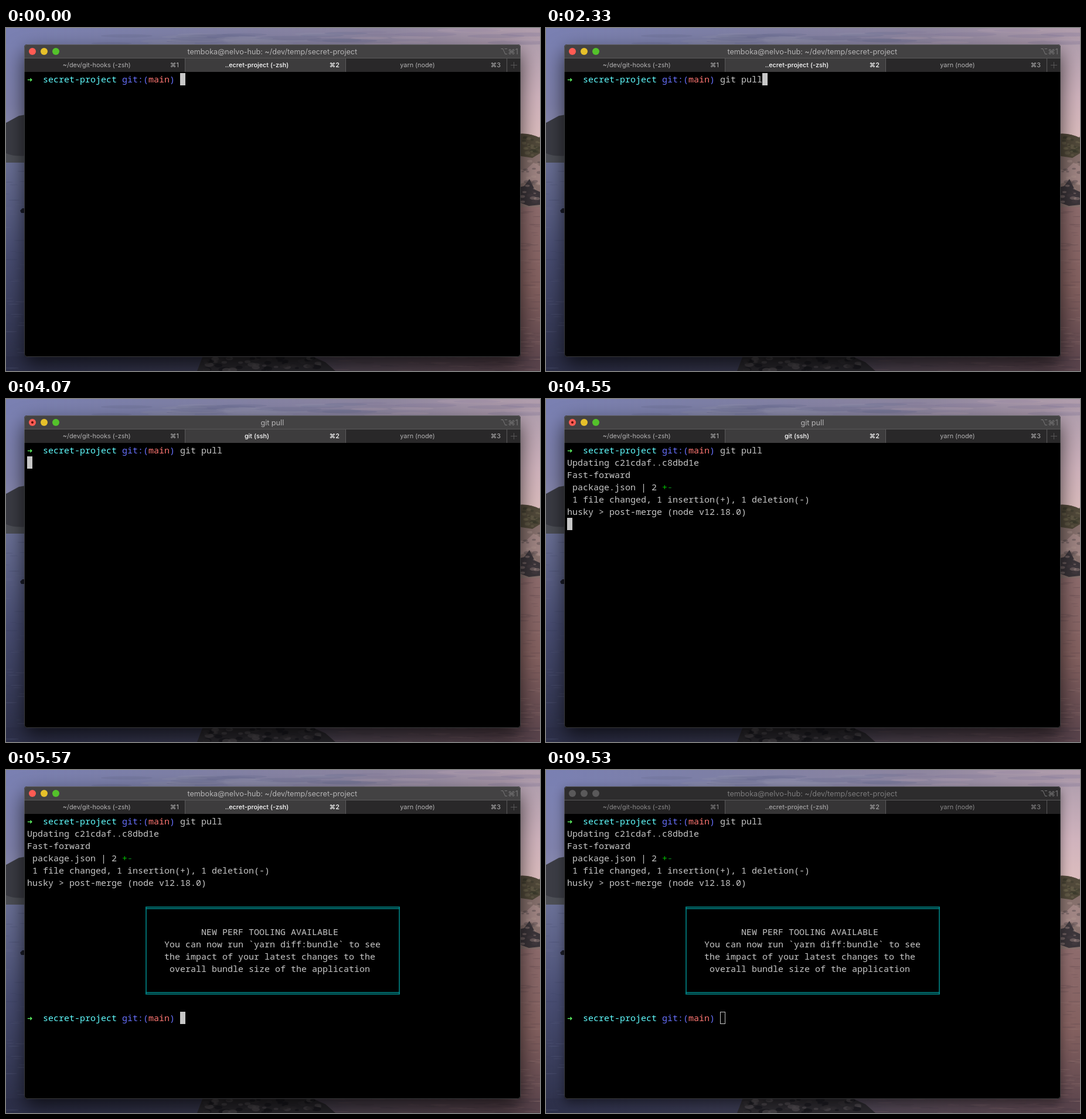
Write an HTML page that moves like this. It is 911 by 586 pixels and loops after 9850 ms.

```html
<!DOCTYPE html>
<html lang="en">
<head>
<meta charset="utf-8">
<title>Terminal: git pull</title>
<style>
html, body { margin: 0; width: 100%; height: 100%; overflow: hidden; background: #000; }
svg { display: block; width: 911px; height: 586px; }
text { white-space: pre; }
.term { font: 15px "Noto Sans Mono", monospace; fill: #c7c7c7; }
.prompt { font-weight: 500; }
.tabs { font: 10.85px Inter, sans-serif; fill: #b4b3b4; }
.tabs .on { font-weight: 500; fill: #fff; }
.title { font: 12.63px Inter, sans-serif; fill: #b6b5b6; }
.mid { text-anchor: middle; }
.end { text-anchor: end; }
.bar { fill: #434243; }
.tab { fill: #292829; }
.active { fill: #3d3c3d; }
.frame { filter: drop-shadow(0 14px 17px rgba(0,0,0,.68)); }
.blur .frame { filter: drop-shadow(0 7px 9px rgba(0,0,0,.45)); }
.blur .lights circle { fill: #5a595a; }
.blur .bar { fill: #2d2c2d; }
.blur .tab { fill: #232223; }
.blur .active { fill: #363536; }
.blur .title { fill: #7c7b7c; }
.blur .tabs { fill: #8a898a; }
.blur .tabs .on { fill: #a3a2a3; }
.blur #cursor { fill: none; stroke: #c7c7c7; }
.blur .plus { display: none; }
</style>
</head>
<body>
<svg id="stage" viewBox="0 0 911 586">
  <defs>
    <linearGradient id="sky">
      <stop offset="0" stop-color="#7a80b2"/><stop offset=".3" stop-color="#7d7fa6"/>
      <stop offset=".7" stop-color="#8d859f"/><stop offset="1" stop-color="#b09cab"/>
    </linearGradient>
    <linearGradient id="leftSky" x2="0" y2="1">
      <stop offset="0" stop-color="#7b81b2"/><stop offset=".5" stop-color="#7f81ab"/>
      <stop offset="1" stop-color="#9494b0"/>
    </linearGradient>
    <linearGradient id="rightSky" x2="0" y2="1">
      <stop offset="0" stop-color="#b3a0af"/><stop offset=".5" stop-color="#d0b3bd"/>
      <stop offset="1" stop-color="#e0c0be"/>
    </linearGradient>
    <linearGradient id="leftSea" x2="0" y2="1">
      <stop offset="0" stop-color="#6a7096"/><stop offset=".45" stop-color="#484d72"/>
      <stop offset="1" stop-color="#2d3049"/>
    </linearGradient>
    <linearGradient id="rightSea" x2="0" y2="1">
      <stop offset="0" stop-color="#8e6c6d"/><stop offset=".5" stop-color="#83605f"/>
      <stop offset="1" stop-color="#59434b"/>
    </linearGradient>
    <linearGradient id="shore">
      <stop offset="0" stop-color="#2d304a"/><stop offset=".4" stop-color="#37374c"/>
      <stop offset=".65" stop-color="#4d424e"/><stop offset="1" stop-color="#59434b"/>
    </linearGradient>
    <clipPath id="window"><rect x="31" y="28" width="847" height="534" rx="5"/></clipPath>
    <g id="prompt" class="term prompt">
      <text x="36" y="92" fill="#5ff967" style="font:bold 11px 'DejaVu Sans',sans-serif">➜</text>
      <text x="63" y="93" fill="#60fdff">secret-project</text>
      <text x="198" y="93" fill="#6871ff">git:(<tspan fill="#ff7672">main</tspan>)</text>
    </g>
  </defs>

  <rect width="911" height="586" fill="url(#sky)"/>
  <rect y="28" width="120" height="205" fill="url(#leftSky)"/>
  <rect x="800" y="28" width="111" height="180" fill="url(#rightSky)"/>
  <g id="clouds"></g>
  <path d="M0 162 L22 150 34 148 V231 H0z" fill="#3b3c44"/>
  <path d="M0 214 Q14 220 34 218 V231 H0z" fill="#4d4f56"/>
  <rect y="230" width="400" height="356" fill="url(#leftSea)"/>
  <path d="M24 312 l4 -4 h6 v8 h-8z" fill="#1b1d29"/>
  <rect x="500" y="300" width="411" height="286" fill="url(#rightSea)"/>
  <path d="M860 183 Q890 176 911 188 V306 H860z" fill="#86706c"/>
  <path d="M860 183 Q890 176 911 188 V214 L898 222 860 216z" fill="#51493a"/>
  <path d="M860 236 L885 244 900 230 911 236 V268 L896 260 860 272z" fill="#a08583"/>
  <path d="M860 276 L884 270 893 258 902 276 911 280 V302 L892 304 860 292z" fill="#3b353a"/>
  <rect y="561" width="911" height="25" fill="url(#shore)"/>
  <path d="M326 586 L336 560 H520 L545 571 562 586z" fill="#29272c"/>
  <g id="texture"></g>

  <rect class="frame" x="31" y="28" width="847" height="534" rx="5"/>
  <g clip-path="url(#window)">
    <rect class="bar" x="31" y="28" width="847" height="24"/>
    <rect class="tab" x="31" y="52" width="847" height="23"/>
    <rect class="active" x="306" y="52" width="273" height="23"/>
    <path d="M31 51.5H878M305.5 52V75M579.5 52V75M854.5 52V75" stroke="#5a595a"/>
    <path class="plus" d="M861 63.5H872M866.5 58V69" stroke="#575657"/>
    <g class="lights">
      <circle cx="45" cy="40" r="6" fill="#ff5b53"/>
      <circle cx="65" cy="40" r="6" fill="#e6c02a"/>
      <circle cx="85" cy="40" r="6" fill="#54c22b"/>
    </g>
    <circle cx="45" cy="40" r="2" fill="#590500" data-from="4010" data-to="5570"/>
    <text id="title" class="title mid" x="454.3" y="45"></text>
    <text class="title end" x="874" y="44.5" style="fill:#757475">⌥⌘1</text>
    <g class="tabs">
      <text class="mid" x="154.8" y="67">~/dev/git-hooks (-zsh)</text>
      <text class="end" x="295" y="67">⌘1</text>
      <text id="job" class="mid on" x="428" y="67"></text>
      <text class="end on" x="569" y="67">⌘2</text>
      <text class="mid" x="702" y="67">yarn (node)</text>
      <text class="end" x="844" y="67">⌘3</text>
    </g>

    <use href="#prompt"/>
    <text id="typed" class="term" x="297" y="93"></text>
    <g class="term" data-from="4430">
      <text x="36" y="114">Updating c21cdaf..c8dbd1e</text>
      <text x="36" y="135">Fast-forward</text>
      <text x="36" y="156"> package.json | 2 <tspan fill="#00c200">+</tspan><tspan fill="#08851a">-</tspan></text>
      <text x="36" y="177"> 1 file changed, 1 insertion(+), 1 deletion(-)</text>
    </g>
    <text class="term" x="36" y="198" data-from="4550">husky &gt; post-merge (node v12.18.0)</text>
    <g class="term" data-from="4790">
      <path d="M238 234.3H672M238 236.7H672M238 380.3H672M238 382.7H672M239 234V383M671 234V383" stroke="#008d8f" stroke-width="1.5"/>
      <text x="333" y="282">NEW PERF TOOLING AVAILABLE</text>
      <text x="270" y="303">You can now run `yarn diff:bundle` to see</text>
      <text x="270" y="324">the impact of your latest changes to the</text>
      <text x="279" y="345">overall bundle size of the application</text>
    </g>
    <use href="#prompt" y="336" data-from="4850"/>
    <rect id="cursor" width="9" height="21" fill="#c7c7c7"/>
  </g>
  <rect x="31.5" y="28.5" width="846" height="533" rx="5" fill="none" stroke="#77767a" stroke-opacity=".5"/>
</svg>
<script>
const LOOP = 9850, UNFOCUS = 9530;
const $ = id => document.getElementById(id);
const COMMAND = 'git pull';
const KEY_TIMES = [900, 1260, 1430, 1550, 1730, 1910, 2210, 2330];
const HOME = 'temboka@nelvo-hub: ~/dev/temp/secret-project';

// Each entry: start time, value
const TITLES = [[0, HOME], [3290, 'git pull'], [4790, HOME]];
const JOBS = [[0, '..ecret-project (-zsh)'], [3290, 'git (-zsh)'], [4070, 'git (ssh)'],
  [4790, '..ecret-project (ssh)'], [5570, '..ecret-project (-zsh)']];
const CURSORS = [[0, [29, 0]], ...KEY_TIMES.map((t, i) => [t, [30 + i, 0]]),
  [3290, [0, 1]], [4430, [0, 5]], [4550, [0, 6]], [4790, [0, 16]], [4850, [29, 16]]];

const at = (track, t) => track.findLast(([start]) => start <= t)[1];

let seed = 7;
const random = () => (seed = seed * 16807 % 2147483647) / 2147483647;

function scatter(id, count, [x, y, w, h], [rx, ry], colors, opacity) {
  let marks = '';
  for (let i = 0; i < count; i++) {
    const cx = x + random() * w, cy = y + random() * h, size = .4 + random() * .6;
    marks += `<ellipse cx="${cx}" cy="${cy}" rx="${rx * size}" ry="${ry * size}" fill="${colors[i % colors.length]}" opacity="${opacity}"/>`;
  }
  $(id).innerHTML += marks;
}

scatter('clouds', 24, [180, 8, 440, 20], [60, 4], ['#666a90', '#8f8ea9'], .3);
scatter('clouds', 14, [620, 0, 291, 28], [60, 4], ['#82799a', '#b3a0af'], .3);
scatter('texture', 50, [0, 236, 31, 350], [12, 1], ['#363b58', '#6c7194'], .2);
scatter('texture', 70, [878, 308, 33, 270], [12, 1], ['#533f47', '#a17e7b'], .25);
scatter('texture', 30, [880, 186, 31, 32], [5, 3], ['#38372a', '#706750'], .5);
scatter('texture', 28, [880, 224, 31, 74], [6, 3], ['#4c4145', '#af9591'], .4);
scatter('texture', 60, [340, 563, 195, 22], [8, 4], ['#17171c', '#4c474c', '#302d32'], .7);
scatter('texture', 40, [560, 562, 351, 24], [18, 1], ['#3d333e', '#7c6469'], .25);

const timed = [...document.querySelectorAll('[data-from]')];

function draw(now) {
  const t = now % LOOP;
  $('title').textContent = at(TITLES, t);
  $('job').textContent = at(JOBS, t);
  $('typed').textContent = COMMAND.slice(0, KEY_TIMES.filter(k => k <= t).length);
  for (const el of timed) {
    const { from, to = LOOP } = el.dataset;
    el.style.display = t >= from && t < to ? '' : 'none';
  }
  const [col, row] = at(CURSORS, t), blurred = t >= UNFOCUS, inset = blurred ? .5 : 0;
  const box = { x: 36 + col * 9 + inset, y: 77 + row * 21 + inset, width: 9 - 2 * inset, height: 21 - 2 * inset };
  for (const key in box) $('cursor').setAttribute(key, box[key]);
  $('stage').classList.toggle('blur', blurred);
}

const start = performance.now();
function tick() {
  draw(performance.now() - start);
  requestAnimationFrame(tick);
}
tick();
</script>
</body>
</html>
```
